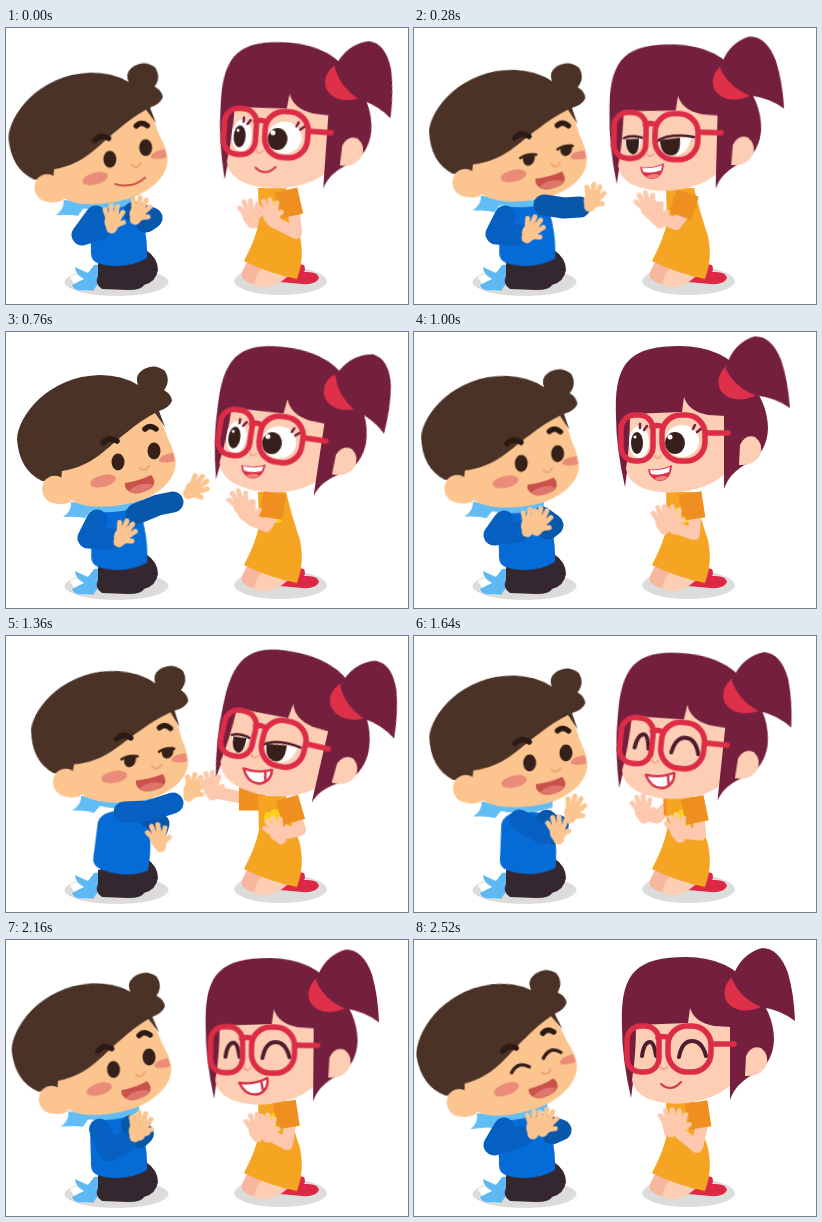
Animation of 402x276 px, one loop 2560 ms. Source, as an HTML page without scripts:

```html
<!DOCTYPE html>
<html lang="en">
<head>
<meta charset="utf-8">
<title>Hand-clapping game</title>
<style>
html, body { margin: 0; width: 100%; height: 100%; overflow: hidden; background: #fff; }
svg { display: block; width: 402px; height: 276px; }
.move { animation: 2.56s ease-in-out infinite; }
.swap { animation: 2.56s step-end infinite; }
.line { fill: none; stroke-linecap: round; stroke-linejoin: round; }
.sleeve { fill: none; stroke: #0660c2; stroke-width: 21; stroke-linecap: round; stroke-linejoin: round; }
.far { stroke: #0757ab; }
.forearm { fill: none; stroke: #fdc8ad; stroke-width: 12; stroke-linecap: round; stroke-linejoin: round; }
.cuff { fill: none; stroke: #ee8f20; stroke-width: 23; }
.boy-skin { fill: #fcc48e; color: #fcc48e; }
.girl-skin { fill: #fdcdb4; color: #fdc8ad; }
#boy-head, #scarf { transform-origin: 129px 137px; animation-name: boy-head; }
#boy-torso { transform-origin: 112px 238px; animation-name: boy-torso; }
#girl-head { transform-origin: 252px 108px; animation-name: girl-head; }
#ponytail { transform-origin: 328px 52px; animation-name: ponytail; }

@keyframes boy-head {
  0% { transform: translate(-8px, 1px) rotate(-1deg); }
  10.94% { transform: translate(3px, 0) rotate(2deg); }
  29.69% { transform: none; }
  39.06% { transform: translate(-5px, 2px) rotate(2deg); }
  53.13% { transform: translate(12px, -6px) rotate(3.6deg); }
  73.44% { transform: translate(-3px, 0) rotate(0deg); }
  98.44%, to { transform: translate(-6px, -3px) rotate(-6deg); }
}
@keyframes boy-torso {
  0%, 39.06%, 73.44%, to { transform: rotate(0deg); }
  10.94%, 29.69% { transform: rotate(1deg); }
  53.13% { transform: rotate(9deg); }
}
@keyframes girl-head {
  0% { transform: translate(5px, -4px) rotate(4deg); }
  10.94% { transform: translate(-13px, -1px) rotate(1.5deg); }
  29.69% { transform: translate(0, -5px) rotate(8.5deg); }
  39.06% { transform: translate(-6px, -3px) rotate(0deg); }
  53.13% { transform: translate(3px, -6.5px) rotate(13deg); }
  73.44% { transform: translate(-14px, 1.5px) rotate(.8deg); }
  98.44%, to { transform: none; }
}
@keyframes ponytail {
  0% { transform: rotate(5deg); }
  10.94% { transform: rotate(-3deg); }
  29.69% { transform: rotate(8deg); }
  39.06%, 53.13% { transform: rotate(-2deg); }
  73.44% { transform: rotate(-1deg); }
  98.44%, to { transform: none; }
}
@keyframes boy-arm-l {
  0% { d: path("M90 188L76 207L95 201"); }
  10.94%, 29.69% { d: path("M91 188L82 206L105 207"); }
  39.06% { d: path("M90 189L80 203L104 200"); }
  53.13% { d: path("M118 176L142 175L167 167"); }
  73.44% { d: path("M96 190L118 215L127 206"); }
  98.44%, to { d: path("M90 188L80 205L108 196"); }
}
@keyframes boy-arm-r {
  0% { d: path("M128 184L146 190L140 194"); }
  10.94% { d: path("M130 177L150 180L166 179"); }
  29.69% { d: path("M130 182L152 173L167 170"); }
  39.06% { d: path("M128 185L139 193L134 197"); }
  53.13% { d: path("M144 182L153 188L151 194"); }
  73.44% { d: path("M124 186L131 196L130 200"); }
  98.44%, to { d: path("M128 184L147 190L138 194"); }
}
@keyframes boy-hand-l {
  0% { transform: translate(107px, 190px) rotate(8deg); }
  10.94%, 29.69% { transform: translate(118px, 201px) rotate(30deg); }
  39.06% { transform: translate(116px, 190px) rotate(16deg); }
  53.13% { transform: translate(187px, 151px) rotate(25deg); }
  73.44% { transform: translate(139px, 189px) rotate(20deg); }
  98.44%, to { transform: translate(121px, 184px) rotate(12deg); }
}
@keyframes boy-hand-r {
  0% { transform: translate(133px, 182px) rotate(22deg); }
  10.94% { transform: translate(179px, 169px) rotate(20deg); }
  29.69% { transform: translate(190px, 155px) rotate(48deg); }
  39.06% { transform: translate(126px, 189px) rotate(20deg); }
  53.13% { transform: translate(152px, 201px) rotate(-15deg); }
  73.44% { transform: translate(137px, 187px) rotate(0deg); }
  98.44%, to { transform: translate(132px, 182px) rotate(20deg); }
}
@keyframes girl-arm-l {
  0% { d: path("M258 180L256 196L246 192"); }
  10.94% { d: path("M262 180L250 192L238 184"); }
  29.69% { d: path("M260 178L250 190L238 182"); }
  39.06% { d: path("M256 178L256 198L250 194"); }
  53.13% { d: path("M245 164L228 160L208 156"); }
  73.44% { d: path("M256 180L254 198L246 194"); }
  98.44%, to { d: path("M260 178L262 198L256 192"); }
}
@keyframes girl-arm-r {
  0% { d: path("M288 185L290 205L268 194"); }
  10.94% { d: path("M270 185L262 196L247 190"); }
  29.69% { d: path("M268 182L260 194L247 188"); }
  39.06%, 73.44% { d: path("M281 185L280 202L262 196"); }
  53.13% { d: path("M290 182L294 194L277 198"); }
  98.44%, to { d: path("M288 185L283 207L266 193"); }
}
@keyframes girl-cuff-l {
  0%, 39.06%, 73.44%, to { d: path("M270 171L262 172"); }
  53.13% { d: path("M260 163L233 163"); }
}
@keyframes girl-cuff-r {
  0% { d: path("M280 162L286 188"); }
  10.94% { d: path("M274 165L266 188"); }
  29.69% { d: path("M269 161L265 186"); }
  39.06%, 73.44% { d: path("M276 161L280 187"); }
  53.13% { d: path("M281 162L288 186"); }
  98.44%, to { d: path("M282 162L286 188"); }
}
@keyframes girl-hand-l {
  0% { transform: translate(244px, 185px) rotate(-12deg); }
  10.94% { transform: translate(233px, 177px) rotate(-22deg); }
  29.69% { transform: translate(234px, 171px) rotate(-22deg); }
  39.06% { transform: translate(249px, 187px) rotate(-8deg); }
  53.13% { transform: translate(205px, 149px) rotate(-8deg); }
  73.44% { transform: translate(246px, 190px) rotate(-12deg); }
  98.44%, to { transform: translate(256px, 182px) rotate(-5deg); }
}
@keyframes girl-hand-r {
  0% { transform: translate(264px, 184px) rotate(-15deg); }
  10.94% { transform: translate(242px, 186px) rotate(-25deg); }
  29.69% { transform: translate(242px, 180px) rotate(-25deg); }
  39.06% { transform: translate(258px, 187px) rotate(-12deg); }
  53.13% { transform: translate(270px, 194px) rotate(-30deg); }
  73.44% { transform: translate(258px, 190px) rotate(-8deg); }
  98.44%, to { transform: translate(264px, 183px) rotate(-8deg); }
}

/* Expressions switch without blending */
@keyframes boy-open { 0%, 15.63%, 57.81% { opacity: 1; } 7.81%, 48.44%, 85.94%, to { opacity: 0; } }
@keyframes boy-half { 0%, 15.63%, 57.81%, to { opacity: 0; } 7.81%, 48.44% { opacity: 1; } }
@keyframes boy-happy { 0% { opacity: 0; } 85.94%, to { opacity: 1; } }
@keyframes boy-smile { 0% { opacity: 1; } 6.25%, to { opacity: 0; } }
@keyframes boy-talk { 0% { opacity: 0; } 6.25%, to { opacity: 1; } }
@keyframes girl-open { 0%, 15.63% { opacity: 1; } 7.81%, 46.88%, to { opacity: 0; } }
@keyframes girl-half { 0%, 15.63%, 60.94%, to { opacity: 0; } 7.81%, 46.88% { opacity: 1; } }
@keyframes girl-happy { 0% { opacity: 0; } 60.94%, to { opacity: 1; } }
@keyframes girl-smile { 0%, 85.94%, to { opacity: 1; } 6.25% { opacity: 0; } }
@keyframes girl-talk { 0%, 46.88%, to { opacity: 0; } 6.25% { opacity: 1; } }
@keyframes girl-grin { 0%, 85.94%, to { opacity: 0; } 46.88% { opacity: 1; } }
</style>
</head>
<body>
<svg viewBox="0 0 402 276">
<defs>
  <g id="hand">
    <ellipse cy="4" rx="8" ry="8.5" fill="currentColor"/>
    <path class="line" stroke="currentColor" stroke-width="5" d="M-5 1L-9-7M-2-1L-3.500-12M2-1L3-12M5 1L9-7M5 6L11 3"/>
    <path class="line" stroke="currentColor" stroke-width="11" d="M0 5V10"/>
  </g>
</defs>

<g fill="#dcdcdc">
  <ellipse cx="110.500" cy="254" rx="52" ry="14"/>
  <ellipse cx="274.500" cy="253" rx="46.500" ry="14"/>
</g>

<!-- boy -->
<path fill="#fff" d="M64 249L84 240L88 247L68 256Z"/>
<path fill="#5cb9f5" d="M100 236L88 237L82 245L69 239Q69 246 78 251L66 257Q68 264 80 262L87 263L100 243Z"/>
<path fill="#352730" d="M92 234L140 222Q152 230 152 242Q150 254 138 257Q136 262 122 262L96 261Q88 256 92 248Z"/>
<path id="boy-torso" class="move" fill="#056bd6" d="M84 190Q86 178 106 175Q126 174 134 182Q142 206 141 230Q120 242 94 236Q84 234 85 222Z"/>
<g id="scarf" class="move" fill="#63bdf5">
  <path d="M57 185Q66 179 65 170L90 172L79 186Q70 184 57 185Z"/>
  <path d="M74 168L136 160L136 174Q108 184 80 178Z"/>
</g>
<g id="boy-head" class="move">
  <path class="boy-skin" d="M60 110L150 79Q158 94 162 107Q172 126 169 137Q164 156 136 168Q108 177 82 174Q62 170 52 158Z"/>
  <path fill="#4b3227" d="M11 107C12 84 42 44 94 43Q116 43 132 53Q128 43 138 37Q149 31 159 39Q165 49 158 58Q166 63 166 69Q163 76 153 79L159 95L149 81Q134 89 120 101C100 116 88 134 56 139L55 149L36 149Q13 138 11 107Z"/>
  <path class="boy-skin" d="M60 149Q49 139 39 148Q32 160 42 169Q52 175 65 170Z"/>
  <g fill="#ea8c79">
    <ellipse cx="97" cy="149" rx="13" ry="6" transform="rotate(-14 97 149)"/>
    <path d="M153 129Q153 123 167 121L169 129Q157 132 153 129Z"/>
  </g>
  <path class="line" stroke="#efa574" stroke-width="2" d="M134 136Q139 141 143 134"/>
  <path class="line" stroke="#2b1a14" stroke-width="5.500" d="M97 111Q103 104 111 109M139 97Q144 92 150 97"/>
  <g class="swap" style="animation-name:boy-open" fill="#35211a">
    <ellipse cx="112" cy="130" rx="6.500" ry="8.500"/>
    <ellipse cx="148" cy="119" rx="6.500" ry="8.500"/>
  </g>
  <g class="swap" style="animation-name:boy-half" fill="#35211a" stroke="#35211a" stroke-linecap="round">
    <path d="M106 130L117 127Q118 137 111 138Q106 138 106 130ZM143 119L154 116Q155 126 148 127Q143 127 143 119Z"/>
    <path class="line" stroke-width="2.500" d="M103 131Q110 126 119 127M140 121Q147 116 155 117"/>
  </g>
  <path class="swap line" style="animation-name:boy-happy" stroke="#35211a" stroke-width="3.500" d="M104 133Q111 122 122 129M137 122Q145 110 155 118"/>
  <path class="swap line" style="animation-name:boy-smile" stroke="#c9544a" stroke-width="2" d="M117 155Q134 160 147 149"/>
  <g class="swap" style="animation-name:boy-talk">
    <path fill="#c9524b" d="M119 151Q133 149 145 143Q152 151 144 157Q130 164 124 160Q118 157 119 151Z"/>
    <path fill="#df766c" d="M123 159Q134 149 147 153Q141 161 130 161Q126 161 123 159Z"/>
  </g>
</g>
<path class="sleeve far move" style="animation-name:boy-arm-r"/>
<path class="sleeve move" style="animation-name:boy-arm-l"/>
<g class="boy-skin">
  <g class="move" style="animation-name:boy-hand-r"><use href="#hand"/></g>
  <g class="move" style="animation-name:boy-hand-l"><use href="#hand"/></g>
</g>

<!-- girl -->
<path fill="#dc2a45" d="M270 240L286 235L298 237Q300 242 298 244Q312 243 313 250Q310 257 296 256L274 254Z"/>
<path fill="#f6b79d" d="M244 228L262 240L250 257Q236 254 235 246Z"/>
<path class="girl-skin" d="M258 230L286 244Q276 256 262 259Q252 260 248 256Q250 246 258 238Z"/>
<path class="forearm move" style="animation-name:girl-arm-l"/>
<path class="cuff move" style="animation-name:girl-cuff-l"/>
<path fill="#f5a521" d="M252 160L280 160Q287 188 294 208Q299 230 291 251Q262 245 238 233Q250 210 253 194Z"/>
<g fill="#fcd11d">
  <circle cx="263" cy="181" r="5"/><circle cx="269" cy="178" r="5"/><circle cx="271" cy="185" r="6"/>
</g>
<g id="girl-head" class="move">
  <path fill="#741f3d" d="M217 158Q208 118 208 88C206 35 220 17 272 17Q315 17 337 47Q360 72 360 100Q359 121 344 132L300 140L222 120Z"/>
  <path class="girl-skin" d="M222 85L274 83L276 68Q280 82 300 86L318 87L317 145Q309 152 297 157Q270 167 245 162Q221 157 218 140Q222 116 222 85Z"/>
  <path fill="#741f3d" d="M316 84V160Q321 144 340 134V84Z"/>
  <path class="girl-skin" d="M332 116Q337 105 347 108Q356 115 352 126Q346 137 331 136Z"/>
  <path fill="#de3049" d="M318 37Q306 49 313 62Q324 76 347 67L344 52Z"/>
  <path id="ponytail" class="move" fill="#741f3d" d="M318 39Q326 14 348 8Q365 8 374 33Q380 54 381 81Q367 70 347 67Q326 58 318 39Z"/>

  <g class="swap" style="animation-name:girl-open">
    <g fill="#fff">
      <ellipse cx="231" cy="113" rx="10" ry="16"/>
      <ellipse cx="274" cy="112" rx="17" ry="16"/>
    </g>
    <g fill="#37201c">
      <ellipse cx="229" cy="114" rx="6" ry="11"/>
      <ellipse cx="267" cy="114" rx="10" ry="11"/>
    </g>
    <g fill="#fff"><circle cx="227" cy="108" r="1.500"/><circle cx="262" cy="108" r="2.500"/></g>
    <path class="line" stroke="#741f3d" stroke-width="2.500" d="M285 100L287 96M289 103L294 99M232 99L232 95M236 101L239 97"/>
  </g>
  <g class="swap" style="animation-name:girl-half">
    <path fill="#fff" d="M224 113L240 111Q240 127 231 128Q224 126 224 113ZM257 114L290 109Q288 128 272 128Q260 126 257 114Z"/>
    <path fill="#37201c" d="M225 113L238 112Q239 128 232 128Q225 126 225 113ZM259 113L279 110Q281 128 270 128Q260 127 259 113Z"/>
    <path class="line" stroke="#4d1c2e" stroke-width="2.500" d="M223 112Q230 108 241 111M255 115Q268 105 293 109"/>
  </g>
  <path class="swap line" style="animation-name:girl-happy" stroke="#4d1c2e" stroke-width="4" d="M228 116Q230 102 236 102Q240 102 242 116M265 117Q268 101 278 101Q288 101 292 116"/>
  <g class="line" stroke="#dc2c46" stroke-width="5.500">
    <rect x="213" y="86" width="32" height="46" rx="14"/>
    <rect x="254" y="86" width="43" height="46" rx="19"/>
    <path d="M244 98Q249 95 255 98M298 104H320"/>
  </g>
  <path class="line" stroke="#f3a78f" stroke-width="2" d="M246 126Q249 132 253 127"/>
  <path class="swap line" style="animation-name:girl-smile" stroke="#d33a4b" stroke-width="2" d="M247 144Q257 153 267 142"/>
  <g class="swap" style="animation-name:girl-talk">
    <path fill="#d9334a" d="M240 140Q250 142 264 136Q263 152 251 152Q241 150 240 140Z"/>
    <path fill="#fff" d="M242 141Q251 142 262 138L261 143Q252 147 243 145Z"/>
    <path fill="#f0817f" d="M246 150Q253 145 260 148Q253 154 246 150Z"/>
  </g>
  <path class="swap" style="animation-name:girl-grin" fill="#fff" stroke="#d9334a" stroke-width="2.500" stroke-linejoin="round" d="M242 142Q257 144 270 137Q272 148 262 153Q249 156 242 142ZM264 140L266 150"/>
</g>
<path class="forearm move" style="animation-name:girl-arm-r"/>
<path class="cuff move" style="animation-name:girl-cuff-r"/>
<g class="girl-skin">
  <g class="move" style="animation-name:girl-hand-l"><use href="#hand"/></g>
  <g class="move" style="animation-name:girl-hand-r"><use href="#hand"/></g>
</g>
</svg>
</body>
</html>
```
